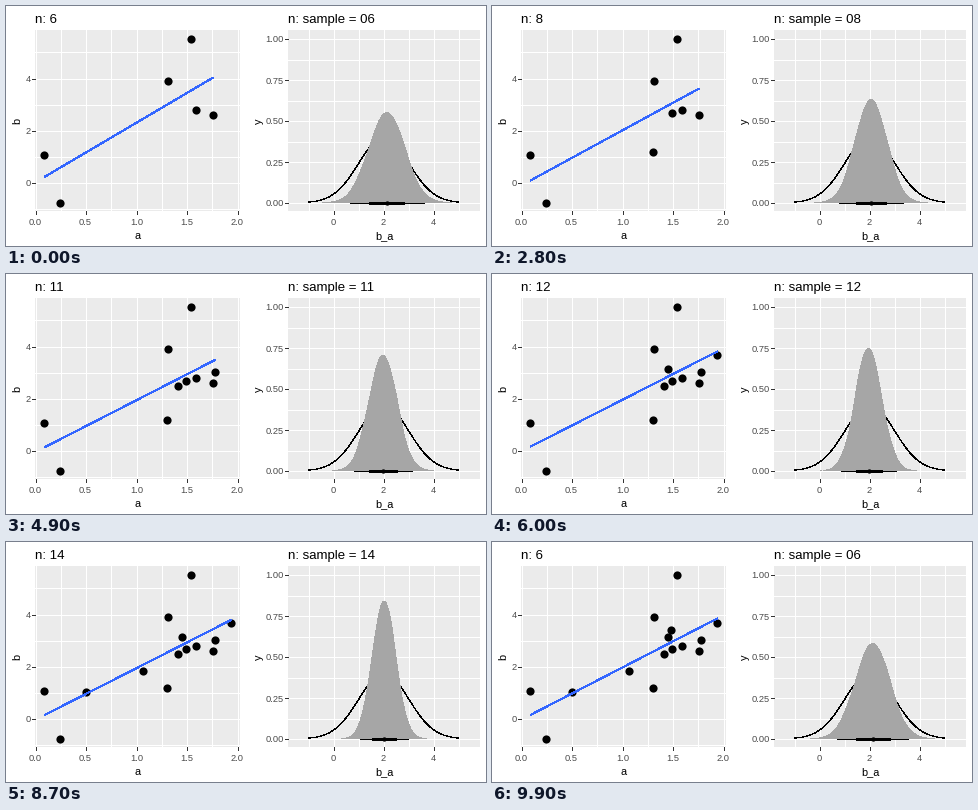
Animation, 480 px wide and 240 px high, one loop 10000 ms. Source, as a matplotlib script:

```python
import math

import matplotlib.pyplot as plt
import numpy as np
from matplotlib.animation import FuncAnimation

W, H, DPI = 480, 240, 72
FRAMES, STEP_MS = 100, 100
PER_STATE, HOLD, TWEEN = 10, 5, 5
FIRST_N, STATES = 6, 10
TOP, BOTTOM = 24, 205

plt.rcParams["font.family"] = "Liberation Sans"

# Observations in the order they join the sample
POINTS = np.array([
    (0.09, 1.04), (0.25, -0.8), (1.31, 3.88), (1.545, 5.48), (1.595, 2.77),
    (1.76, 2.57), (1.49, 2.66), (1.30, 1.15), (1.415, 2.46), (1.78, 3.0),
    (1.455, 3.1), (1.943, 3.65), (1.065, 1.81), (0.50, 1.0), (1.48, 3.38),
])

fig = plt.figure(figsize=(W / DPI, H / DPI), dpi=DPI, facecolor="white")
ax = fig.add_axes([0, 0, 1, 1])
ax.set_xlim(0, W)
ax.set_ylim(H, 0)
ax.axis("off")


def left_xy(a, b):
    return 29.2 + 101 * np.asarray(a), 176.4 - 26.1 * np.asarray(b)


def right_xy(x, y):
    return 327.8 + 25 * np.asarray(x), 196.8 - 164 * np.asarray(y)


def pixel(v):
    """Centre of the pixel that holds v."""
    return math.floor(v) + 0.5


def stroke(x, y, color, width, z, **kw):
    return ax.plot(x, y, color=color, lw=width, zorder=z, antialiased=False,
                   solid_capstyle="butt", **kw)[0]


def disc(size, z):
    return stroke([], [], "black", 0, z, marker="o", ms=size, mec="none")


def label(x, y, text, size, color="black", **kw):
    return ax.text(x, y, text, fontsize=size, color=color, zorder=9, **kw)


def draw_panel(x0, x1, to_xy, x_step, y_step, x_range, y_range, x_fmt, y_fmt):
    """Grey panel with gridlines every half step, ticks every whole step."""
    ax.add_patch(plt.Rectangle((x0, TOP), x1 - x0, BOTTOM - TOP, fc="#EBEBEB",
                               ec="none", zorder=0))
    for i in range(*x_range):
        v = i * x_step / 2
        px = pixel(to_xy(v, 0)[0])
        stroke([px, px], [TOP, BOTTOM], "white", 1, 1)
        if i % 2 == 0:
            stroke([px, px], [BOTTOM, BOTTOM + 3], "#333333", 1, 1)
            label(px, 219, x_fmt.format(v), 9.2, "#4D4D4D", ha="center")
    for i in range(*y_range):
        v = i * y_step / 2
        py = pixel(to_xy(0, v)[1])
        stroke([x0, x1], [py, py], "white", 1, 1)
        if i % 2 == 0:
            stroke([x0 - 3, x0], [py, py], "#333333", 1, 1)
            label(x0 - 4.5, py + 4, y_fmt.format(v), 9.2, "#4D4D4D",
                  ha="right")


draw_panel(29, 234, left_xy, 0.5, 2, (0, 9), (-1, 6), "{:.1f}", "{:.0f}")
draw_panel(282, 474, right_xy, 2, 0.25, (-1, 6), (0, 9), "{:.0f}", "{:.2f}")

label(131.5, 233, "a", 11, ha="center")
label(378, 233, "b_a", 11, ha="center")
label(11, 115, "b", 11, rotation=90, ha="center", va="center")
label(253, 115, "y", 11, rotation=90, ha="center", va="center")
left_title = label(29, 17, "", 13.2)
right_title = label(282, 17, "", 13.2)

# Aliased strokes grow by about a pixel, so slanted ones are set thin
grid = np.linspace(-1, 5, 101)
stroke(*right_xy(grid, np.exp(-(grid - 2) ** 2 / 2) / math.sqrt(2 * math.pi)),
       "black", 0.25, 2)
fit_line = stroke([], [], "#3366FF", 1.1, 4)
slab = ax.fill([0, 0, 0], [0, 0, 0], fc="#A6A6A6", ec="none", zorder=3,
               antialiased=False)[0]
thin = stroke([], [], "black", 1, 5)
thick = stroke([], [], "black", 3, 5)
dots, median = disc(8.2, 3), disc(4.4, 6)

U = np.linspace(-3.6, 3.6, 301)
PHASES = np.random.default_rng(4).uniform(0, 2 * math.pi, (STATES, 2))


def posterior(s):
    """Centre, spread and outline; narrows steadily as the sample grows."""
    mean = 2.035 + 0.085 * math.cos(math.pi * s / 6)
    peak = 0.55 * 1.052 ** s
    spread = 0.395 / peak
    p, q = PHASES[s]
    ripple = 0.03 * np.sin(2.6 * U + p) + 0.02 * np.sin(4.7 * U + q)
    fade = U ** 2 / (0.5 + U ** 2)
    y = peak * np.exp(-U ** 2 / 2) * (1 + ripple * fade)
    return mean, spread, mean + U * spread, y


def ease(t):
    return (1 - math.cos(math.pi * t)) / 2


def update(frame):
    state, step = divmod(frame, PER_STATE)
    step = max(0, step - HOLD)
    nxt = (state + 1) % STATES
    t = ease(step / TWEEN)

    n = FIRST_N + (nxt if step > (TWEEN + 1) / 2 else state)
    left_title.set_text(f"n: {n}")
    right_title.set_text(f"n: sample = {n:02d}")

    a, b = POINTS[:FIRST_N + state].T
    dots.set_data(*left_xy(a, b))
    slope, base = np.polyfit(a, b, 1)
    span = np.linspace(a.min(), a.max(), 80)
    fit_line.set_data(*left_xy(span, base + slope * span))

    mean, spread, x, y = (p + (q - p) * t
                          for p, q in zip(posterior(state), posterior(nxt)))
    px, py = right_xy(x, y)
    floor = pixel(right_xy(0, 0)[1])
    slab.set_xy(np.column_stack([np.r_[px[0], px, px[-1]],
                                 np.r_[floor, py, floor]]))
    for line, reach in ((thin, 2.05), (thick, 0.98)):
        ends = mean + spread * reach * np.array([-1, 1])
        line.set_data(right_xy(ends, 0)[0], [floor, floor])
    median.set_data([right_xy(mean, 0)[0]], [floor])
    return []


anim = FuncAnimation(fig, update, frames=FRAMES, interval=STEP_MS,
                     repeat=True, repeat_delay=0, blit=False)
plt.show()
```
